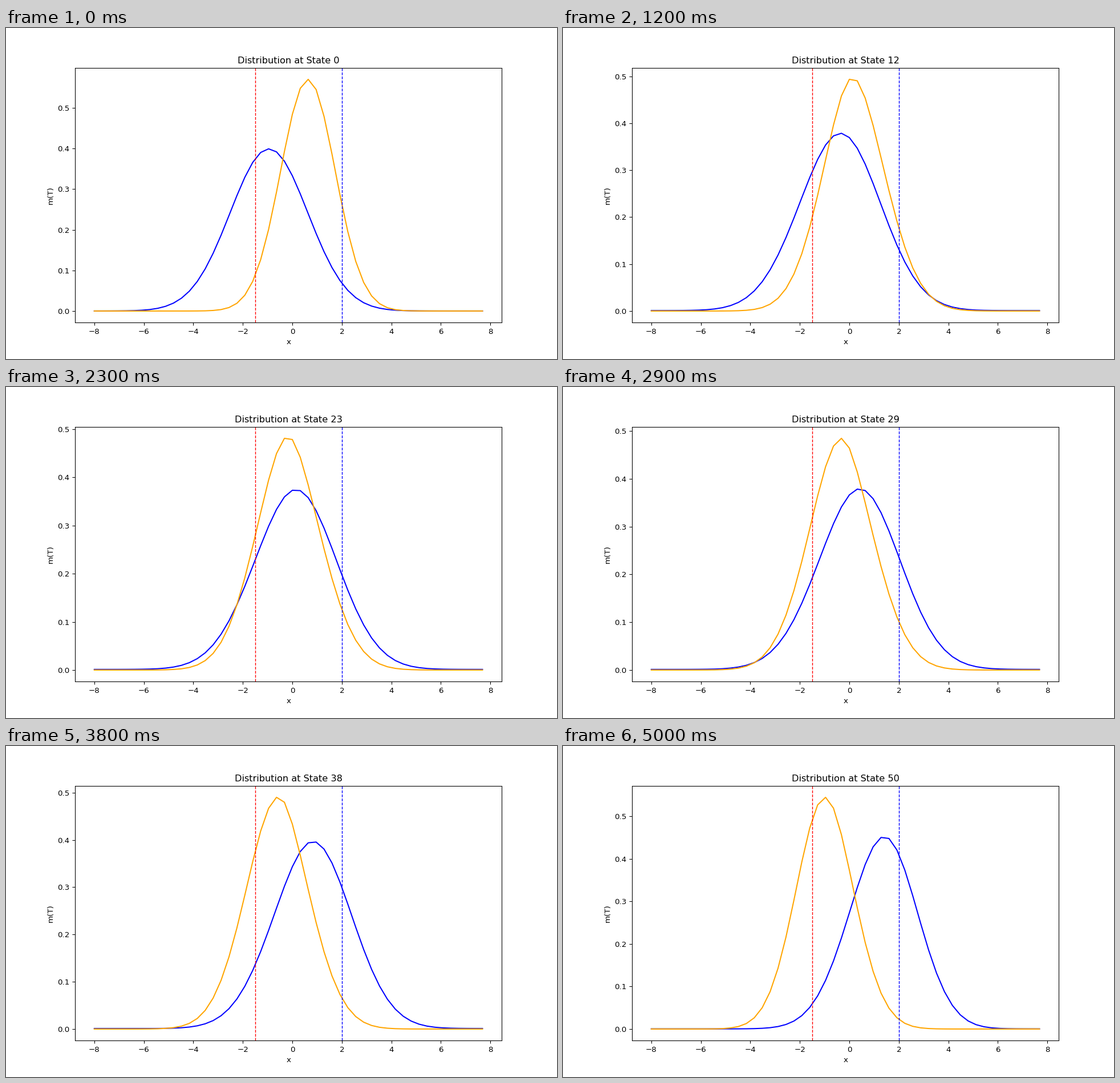
A matplotlib script that plays this animation: 966 by 580 pixels, repeating every 5100 ms.

```python
import numpy as np
import matplotlib.pyplot as plt
from matplotlib.animation import FuncAnimation

plt.rcParams["font.family"] = "DejaVu Sans"

WIDTH, HEIGHT, DPI = 966, 580, 96.6
STATES = 51
x = -8 + 0.32 * np.arange(50)


def curve(*keys):
    """Polynomial in time through key values spaced evenly over the loop."""
    times = np.linspace(0, 1, len(keys))
    return np.poly1d(np.polyfit(times, keys, len(keys) - 1))


def bell(mode, height, left, left_gain, right, right_gain, floor):
    """Skewed bell; on each side the variance grows away from the mode."""
    def density(u):
        d = x - mode(u)
        reach = np.tanh(np.abs(d) / 2)
        var = np.where(d < 0, left(u) + left_gain(u) * reach,
                       right(u) + right_gain(u) * reach)
        return floor(u) + height(u) * np.exp(-d ** 2 / (2 * var))
    return density


blue = bell(
    mode=curve(-0.945, -0.145, 0.61, 1.41),
    height=curve(0.3992, 0.3775, 0.3744, 0.3945, 0.452),
    left=curve(2.46, 2.47, 1.766),
    left_gain=curve(0, 0.35, 0.33),
    right=curve(2.46, 2.66, 2.58, 1.8),
    right_gain=curve(0),
    floor=curve(0, 0.0012, 0.0003),
)
orange = bell(
    mode=curve(0.63, -0.012, -0.425, -0.98),
    height=curve(0.5703, 0.496, 0.4845, 0.4906, 0.5446),
    left=curve(1.21, 1.137, 1.367, 1.61, 1.35),
    left_gain=curve(0, 0.5, 0.25, 0),
    right=curve(1.21, 1.286, 1.099, 1.02, 1.15),
    right_gain=curve(0, 0.8, 0.27),
    floor=curve(0),
)

fig, ax = plt.subplots(figsize=(WIDTH / DPI, HEIGHT / DPI), dpi=DPI)
lines = [(ax.plot(x, bell_at(0), color=color)[0], bell_at)
         for bell_at, color in ((blue, "blue"), (orange, "orange"))]
margin = 0.05 * (x[-1] - x[0])
ax.set_xlim(x[0] - margin, x[-1] + margin)
for place, color in ((-1.5, "red"), (2, "blue")):
    ax.axvline(place, color=color, linestyle="--", linewidth=1)
ax.set_xlabel("x")
ax.set_ylabel("m(T)")
title = ax.set_title("")


def update(state):
    top = 0
    for line, bell_at in lines:
        y = bell_at(state / (STATES - 1))
        line.set_ydata(y)
        top = max(top, y.max())
    ax.set_ylim(-0.05 * top, 1.05 * top)
    title.set_text(f"Distribution at State {state}")
    return [line for line, _ in lines] + [title]


anim = FuncAnimation(fig, update, frames=STATES, interval=100, repeat=True,
                     repeat_delay=0, blit=False)
plt.show()
```
